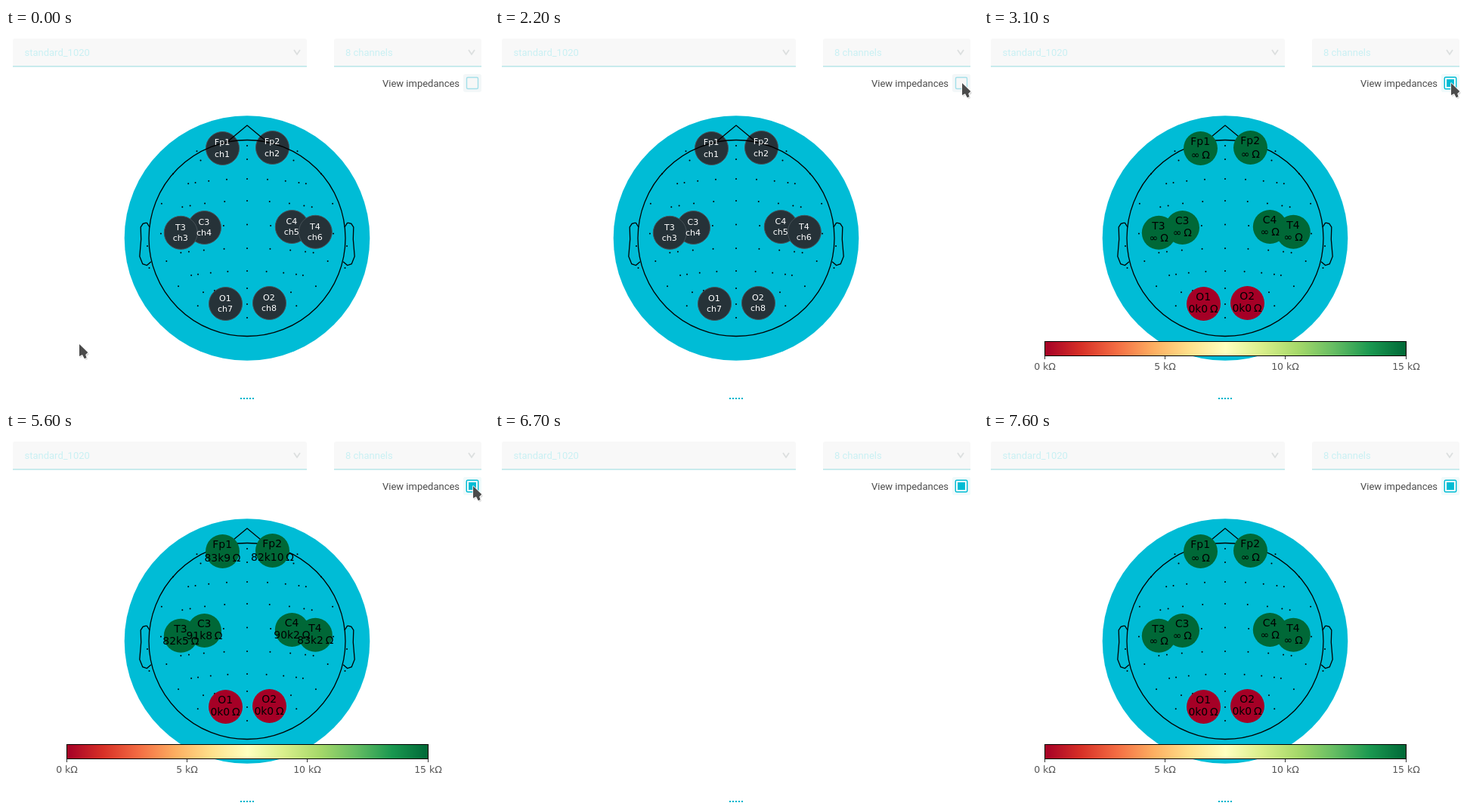
Write an HTML page that moves like this. It is 639 px wide and 497 px high and loops after 8000 ms.

```html
<!DOCTYPE html>
<html lang="en">
<head>
<meta charset="utf-8">
<title>Electrode impedances</title>
<style>
html, body { margin: 0; width: 100%; height: 100%; overflow: hidden; background: #fff; }
svg { display: block; width: 639px; height: 497px; }
text { font-family: "DejaVu Sans", sans-serif; text-anchor: middle; }
.ui text { font: 13px Roboto, sans-serif; text-anchor: start; fill: #c9f0f3; }
.ui .label { fill: #4c4c4c; }
.field { fill: #f8f8f8; }
.rule { fill: #bfe8ea; }
.chevron { fill: none; stroke: #dcdfdf; stroke-width: 1.8; }
.outline { fill: none; stroke: #000; stroke-width: 1.3; }
#dark circle { fill: #263238; stroke: #465157; stroke-width: 1; }
#tags text { fill: #fff; font-size: 11.1px; }
#imp text { font-size: 13.9px; }
#scale text { font-size: 12.5px; fill: #555; }

/* hard switches over the 8 s loop */
.anim { animation: 8s step-end infinite; }
#head { animation-name: head; }
#dark, #tags { animation-name: before; }
#imp, #scale { animation-name: after; }
#open { animation-name: open; }
#values { animation-name: values; }
#checked { animation-name: checked; }
#cursor { animation-name: move; }
@keyframes head { 0% { opacity: 1 } 83.75% { opacity: 0 } 87.5%, 100% { opacity: 1 } }
@keyframes before { 0% { opacity: 1 } 38.75%, 100% { opacity: 0 } }
@keyframes after { 0% { opacity: 0 } 38.75% { opacity: 1 } 83.75% { opacity: 0 } 87.5%, 100% { opacity: 1 } }
@keyframes open { 0% { opacity: 1 } 70% { opacity: 0 } 95%, 100% { opacity: 1 } }
@keyframes values { 0% { opacity: 0 } 70% { opacity: 1 } 95%, 100% { opacity: 0 } }
@keyframes checked { 0% { opacity: 0 } 37.5%, 100% { opacity: 1 } }
/* the pointer moves every 100 ms */
@keyframes move {
  0% { transform: translate(97px, 419px) }
  13.75% { transform: translate(130px, 455px); animation-timing-function: steps(5) }
  20% { transform: translate(628px, 140px); animation-timing-function: steps(3) }
  23.75% { transform: translate(600px, 70px) }
  26.25% { transform: translate(609px, 69px) }
  27.5% { transform: translate(618px, 73px) }
  78.75% { transform: translate(584px, 85px); animation-timing-function: steps(4) }
  83.75%, 100% { transform: translate(-176px, 113px) }
}
</style>
</head>
<body>
<svg viewBox="0 0 639 497">
  <defs><linearGradient id="ramp"></linearGradient></defs>

  <g class="ui">
    <path class="field" d="M9 50V17q0-3 3-3H395q3 0 3 3V50z"/>
    <path class="field" d="M434 50V17q0-3 3-3H626q3 0 3 3V50z"/>
    <rect class="rule" x="9" y="50" width="389" height="1.7"/>
    <rect class="rule" x="434" y="50" width="195" height="1.7"/>
    <path class="chevron" d="M381 29l4 6 4-6M612 29l4 6 4-6"/>
    <text x="24.5" y="37">standard_1020</text>
    <text x="449" y="37">8 channels</text>
    <text class="label" x="498" y="78">View impedances</text>
    <rect x="605" y="61" width="24" height="24" rx="3" fill="#f3f7f8"/>
    <rect x="609.5" y="65.5" width="15" height="15" rx="1.5" fill="#f7f7f7" stroke="#a3dfe9" stroke-width="1.4"/>
    <g id="checked" class="anim">
      <rect x="605" y="61" width="24" height="24" rx="3" fill="#f0fafb"/>
      <rect x="609.3" y="65.3" width="15.4" height="15.4" rx="1.5" fill="#fff" stroke="#00bcd4" stroke-width="1.5"/>
      <rect x="612" y="68" width="10" height="10" fill="#00bcd4"/>
    </g>
    <path d="M310 491h18" stroke="#00b4cc" stroke-width="2" stroke-dasharray="2"/>
  </g>

  <g id="head" class="anim">
    <circle cx="319" cy="278.5" r="162.3" fill="#00bcd6"/>
    <g id="dots"></g>
    <g id="dark" class="anim"></g>
    <circle class="outline" cx="319" cy="278.5" r="130"/>
    <path class="outline" d="M292 151.4L319 129L346 151.4"/>
    <path id="ear" class="outline" d="M190 264l-3.5-5.7h-2l-3.3 1-3 4.7.5 16-1.9 22.7 4 10 5.6 1.8 5.5-4.8"/>
    <use href="#ear" transform="translate(638) scale(-1 1)"/>
    <g id="tags" class="anim"></g>
  </g>

  <g id="imp" class="anim">
    <g id="discs"></g>
    <g id="names"></g>
    <g id="open" class="anim"></g>
    <g id="values" class="anim"></g>
  </g>

  <g id="scale" class="anim">
    <rect x="80.5" y="415.5" width="478" height="19" fill="url(#ramp)" stroke="#000"/>
  </g>

  <g id="cursor" class="anim">
    <path d="M1 2v16l4-2 3 5 3-1-1-4 3-3z" opacity=".15"/>
    <path d="M0 0V16L4 14L6.8 19.3L9.6 18L8.2 14L11.3 11z" fill="#4b4b4b" stroke="#fff" stroke-width="1.6" stroke-linejoin="round" paint-order="stroke"/>
  </g>
</svg>
<script>
const $ = id => document.getElementById(id);
function add(parent, tag, attrs, text) {
  const el = document.createElementNS("http://www.w3.org/2000/svg", tag);
  for (const k in attrs) el.setAttribute(k, attrs[k]);
  if (text) el.textContent = text;
  return parent.appendChild(el);
}
const label = (id, x, y, text) => add($(id), "text", { x, y: Math.round(y) }, text);

// name, channel, centre, impedance; later nodes cover earlier ones
const nodes = [
  ["Fp1", 1, 286.5, 159.5, "83k9"],
  ["Fp2", 2, 352.5, 158.5, "82k10"],
  ["C3", 4, 262.5, 264.5, "91k8"],
  ["C4", 5, 378.3, 263.5, "90k2"],
  ["T3", 3, 231.3, 271.3, "82k5"],
  ["T4", 6, 409.3, 270.3, "83k2"],
  ["O1", 7, 290.5, 365.5],
  ["O2", 8, 348.5, 364.5]
];
for (const [name, ch, cx, cy, ohms] of nodes) {
  const drop = name.includes("p") ? 1 : 0; // descenders push the lines apart
  add($("dark"), "circle", { cx, cy, r: 22 });
  label("tags", cx - 0.5, cy - 3.5 - drop, name);
  label("tags", cx - 0.5, cy + 10.6 + drop, "ch" + ch);
  add($("discs"), "circle", { cx, cy, r: 22.5, fill: ohms ? "#006837" : "#a50026" });
  label("names", cx - 0.3, cy - 4.6, name);
  const y = cy + 11.4 + 2 * drop;
  if (ohms) {
    label("open", cx, y, "∞\u2009Ω");
    label("values", cx, y, ohms + "\u2009Ω");
  } else label("names", cx - 0.5, y, "0k0\u2009Ω");
}

// montage: bent rows, an outer ring and two ear points, mirrored on the midline
const rad = Math.PI / 180;
const dot = (x, y) => add($("dots"), "circle", { cx: 319 + x, cy: y, r: 1 });
const pair = (x, y) => { dot(-x, y); dot(x, y); };
function row(y, width, bend, count) {
  dot(0, y);
  for (let k = 1; k <= count; k++) {
    const s = Math.sin(k * 20 * rad);
    pair(width * s, y + bend * s * s);
  }
}
row(174, 71, 2, 3);
row(200, 79, 6.5, 4);
row(229, 87, 8.5, 4);
row(260.5, 91, 12, 4);
row(292, 89, 6, 4);
row(322, 75, 6, 4);
row(345, 67, 7, 3);
for (const y of [156, 366, 384]) dot(0, y);
for (let i = 0; i < 7; i++) {
  const a = (30 + 19 * i) * rad;
  const r = 122 + 11 * Math.cos(Math.min(i, 4) * 45 * rad);
  pair(r * Math.sin(a), 278.5 - r * Math.cos(a));
}
pair(132, 289);
pair(129.5, 318);

"a50026 d73027 f46d43 fdae61 fee08b ffffbf d9ef8b a6d96a 66bd63 1a9850 006837".split(" ")
  .forEach((c, i) => add($("ramp"), "stop", { offset: i / 10, "stop-color": "#" + c }));
for (let i = 0; i < 4; i++) {
  const x = Math.floor(80 + i * 159.4) + 0.5;
  add($("scale"), "path", { d: `M${x} 435v4`, stroke: "#333" });
  label("scale", x, 453, i * 5 + " kΩ");
}
</script>
</body>
</html>
```
